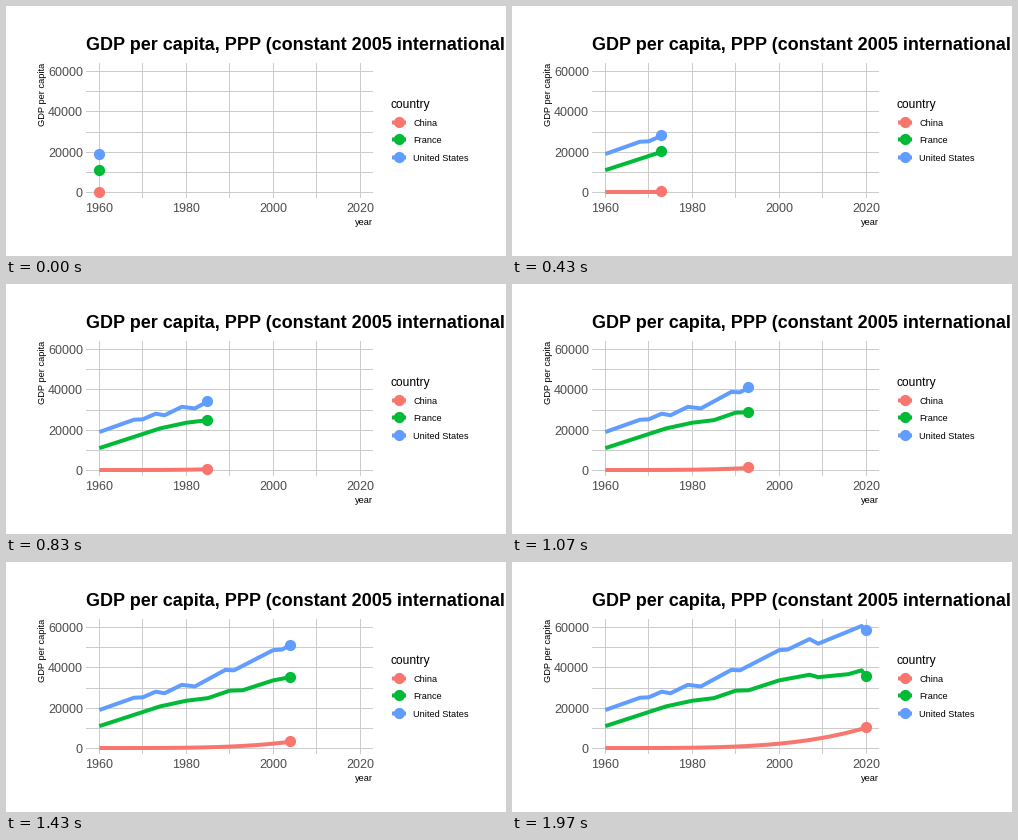
Write a matplotlib script that moves like this. It is 500x250 px and loops after 2 s.

```python
import matplotlib.pyplot as plt
import numpy as np
from matplotlib.animation import FuncAnimation
from matplotlib.patches import Circle

W, H, DPI = 500, 250, 100
PX = 72 / DPI  # points per pixel
TICKS, STEPS = 200, 60
FIRST, LAST = 1960, 2020
GRID, GREY = "#cccccc", "#4d4d4d"

plt.rcParams["font.family"] = "Liberation Sans"


def px_x(year):
    return 93.3 + (year - FIRST) * 4.345


def px_y(thousands):
    return 186.5 - thousands * 2.015


def pixel(v):
    """Centre of the pixel that holds v."""
    return np.floor(v) + 0.5


def label(x, y, s, size, color="black", **kw):
    ax.text(x, y, s, fontsize=size * PX, color=color,
            **{"va": "baseline", **kw})


def line(xs, ys, color, width, z):
    return ax.plot(xs, ys, color=color, lw=width * PX, zorder=z, snap=False,
                   solid_capstyle="butt", solid_joinstyle="round")[0]


def dot(x, y, color):
    return ax.add_patch(Circle((pixel(x), pixel(y)), 5.6, fc=color, lw=0,
                               zorder=3))


def through(*points):
    """Yearly values on straight runs between the turning points."""
    return np.interp(years, *zip(*points))


# GDP per capita in thousands
years = np.arange(FIRST, LAST + 1)
china = 0.24 + 10.1 * ((years - FIRST) / (LAST - FIRST)) ** 3.8
france = through((1960, 11.1), (1974, 20.9), (1980, 23.7), (1985, 25),
                 (1990, 28.7), (1993, 28.9), (2000, 33.8), (2007, 36.6),
                 (2009, 35.4), (2016, 36.9), (2019, 38.8), (2020, 35.8))
usa = through((1960, 19.1), (1968, 25.2), (1970, 25.4), (1973, 28.2),
              (1975, 27.4), (1979, 31.6), (1982, 30.8), (1989, 39),
              (1991, 38.8), (2000, 48.8), (2002, 49.1), (2007, 54.3),
              (2009, 52), (2019, 60.8), (2020, 58.6))
series = [("China", "#F8766D", china), ("France", "#00BA38", france),
          ("United States", "#619CFF", usa)]

fig = plt.figure(figsize=(W / DPI, H / DPI), dpi=DPI, facecolor="white")
ax = fig.add_axes([0, 0, 1, 1])
ax.set(xlim=(0, W), ylim=(H, 0))
ax.axis("off")

for year in range(FIRST, LAST + 1, 10):
    x = px_x(year)
    line([pixel(x)] * 2, [57, 192], GRID, 1, 1)
    if year % 20 == 0:
        label(x, 206, str(year), 12.5, GREY, ha="center")
for value in range(0, 61, 10):
    y = px_y(value)
    line([80, 367], [pixel(y)] * 2, GRID, 1, 1)
    if value % 20 == 0:
        label(77, y + 4.6, str(value * 1000), 12.5, GREY, ha="right")

label(80, 44, "GDP per capita, PPP (constant 2005 international $)", 18.05,
      weight="bold")
label(41, 120.5, "GDP per capita", 9.3, rotation=90, ha="right", va="bottom")
label(367, 219, "year", 9.3, ha="right")
label(384.5, 102, "country", 12)

tracks = []
for k, (name, color, values) in enumerate(series):
    y = 116.6 + 17.28 * k
    line([386, 400], [pixel(y)] * 2, color, 4, 2)
    dot(393, y, color)
    label(407, y + 3.6, name, 9.1)
    tracks.append((px_y(values), line([], [], color, 4, 2),
                   dot(px_x(FIRST), px_y(values[0]), color)))

xs = px_x(years)


def update(tick):
    step = (3 * tick + 1) // 10
    n = round(step * (LAST - FIRST) / (STEPS - 1))
    for ys, path, head in tracks:
        path.set_data(xs[:n + 1], ys[:n + 1])
        head.set_center((pixel(xs[n]), pixel(ys[n])))
    return [artist for _, *pair in tracks for artist in pair]


anim = FuncAnimation(fig, update, frames=TICKS, interval=10, repeat=True,
                     repeat_delay=0)
plt.show()
```
